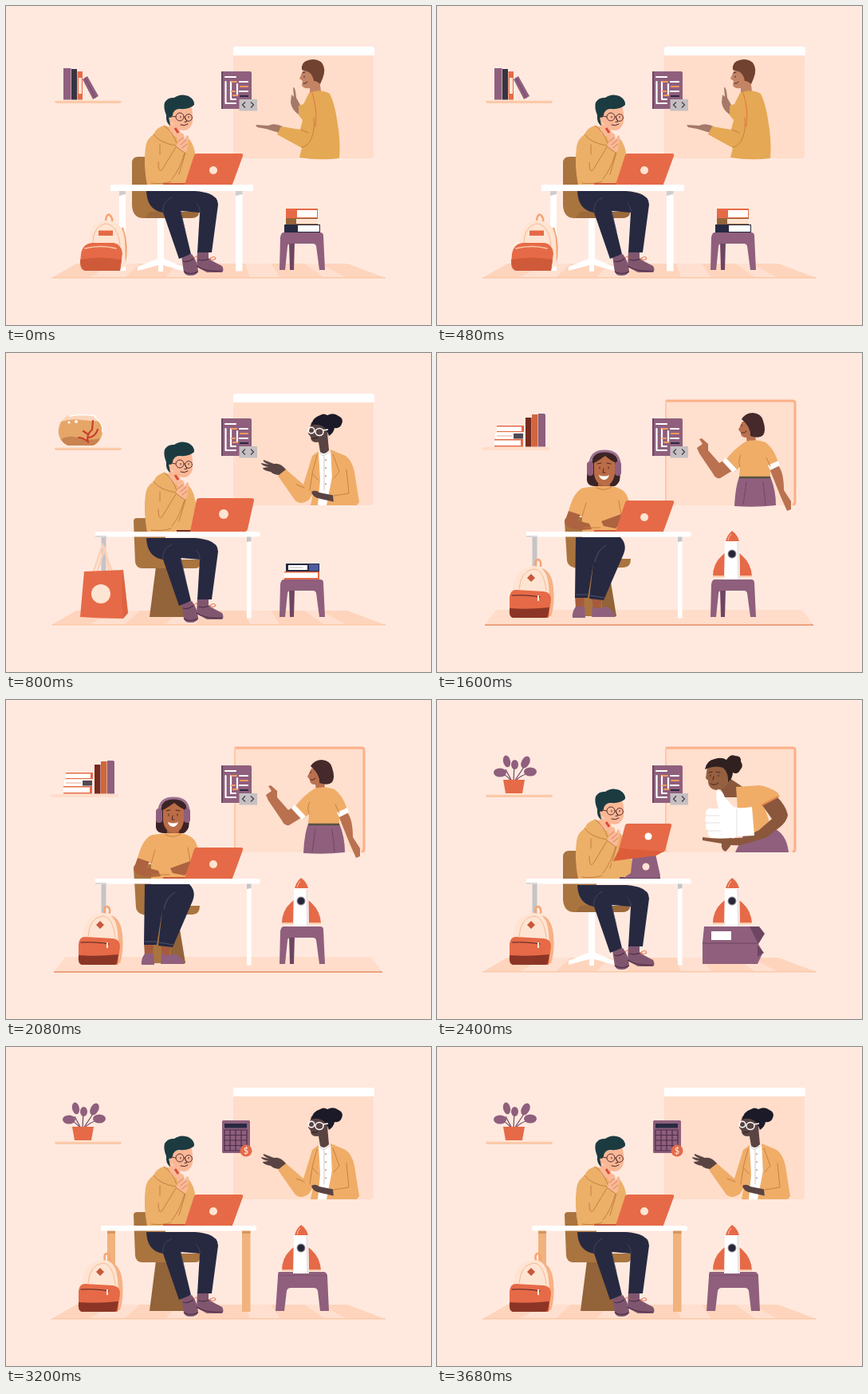
These frames come from a looping animation (533x400 px, 4000 ms). An HTML page:

```html
<!DOCTYPE html>
<html lang="en">
<head>
<meta charset="utf-8">
<title>Online lessons</title>
<style>
html, body { margin: 0; width: 100%; height: 100%; overflow: hidden; background: #ffe9df; }
svg { display: block; width: 100%; height: 100%; }
.scene { visibility: hidden; animation: 4s step-end infinite; }
#s0 { animation-name: a; } #s1 { animation-name: b; } #s2 { animation-name: c; }
#s3 { animation-name: d; } #s4 { animation-name: e; }
@keyframes a { 0% { visibility: visible } 20%, 100% { visibility: hidden } }
@keyframes b { 0% { visibility: hidden } 20% { visibility: visible } 40%, 100% { visibility: hidden } }
@keyframes c { 0% { visibility: hidden } 40% { visibility: visible } 60%, 100% { visibility: hidden } }
@keyframes d { 0% { visibility: hidden } 60% { visibility: visible } 80%, 100% { visibility: hidden } }
@keyframes e { 0% { visibility: hidden } 80%, 100% { visibility: visible } }
.red { fill: #e66a47 } .rust { fill: #cf5a3a } .wine { fill: #76291f }
.gold { fill: #ecb069 } .amber { fill: #f0ad68 } .wood { fill: #aa743f } .bark { fill: #936339 }
.plum { fill: #8f5f7d } .dusk { fill: #6e4562 } .shoe { fill: #80566f } .navy { fill: #272941 }
.white { fill: #fff } .cream { fill: #fee4d2 } .peach { fill: #ffddca } .tan { fill: #fbc9a8 }
.skin { fill: #fab896 } .dark { fill: #5a4443 } .brown { fill: #8a573d } .hair { fill: #1c3b41 }
.ln { fill: none; stroke: #c07c3d; stroke-width: .9; stroke-linecap: round; stroke-linejoin: round }
.dk { fill: none; stroke: #4a2528; stroke-width: 1; stroke-linecap: round }
.wl { fill: none; stroke: #fff; stroke-width: 1.5; stroke-linecap: round }
.bar { fill: none; stroke: #fff; stroke-width: 2.2; stroke-linecap: round }
.ol { fill: none; stroke: #f3995f; stroke-width: 2.2; stroke-linecap: round }
</style>
</head>
<body>
<svg viewBox="0 0 533 400" preserveAspectRatio="none">
<defs>
  <g id="floor">
    <path fill="#fed4bc" d="M88 323H428L476 341H57z"/>
    <path fill="#ffe0d0" d="M134 323H168L148 341H104zM216 323H246L238 341H200zM300 323H332L344 341H306zM374 323H394L428 341H400z"/>
    <path class="tan" d="M57 340H476V341.500H57z"/>
  </g>
  <g id="shelf">
    <path class="cream" d="M63 117.500H142L145 119.500H61z"/>
    <path class="tan" d="M61 119H145Q145 122 142 122H64Q61 122 61 119z"/>
  </g>
  <g id="plant">
    <path d="M94 102L86 87M96 102L97 80M97 102L109 84M93 102Q88 94 80 92M98 102Q105 94 115 92" fill="none" stroke="#6e4562" stroke-width="1.200"/>
    <g class="plum">
      <ellipse cx="79" cy="91" rx="8" ry="5.500"/>
      <ellipse cx="87.500" cy="77" rx="4.500" ry="7.500" transform="rotate(-12 87 77)"/>
      <ellipse cx="97.500" cy="81" rx="4.500" ry="6"/>
      <ellipse cx="111" cy="78" rx="5" ry="8" transform="rotate(28 111 78)"/>
      <ellipse cx="117" cy="90" rx="8" ry="5.500"/>
    </g>
    <path class="red" d="M83 100H110L107 117H86z"/>
  </g>
  <g id="wall">
    <path class="peach" d="M285 61H461V187Q461 191 457 191H285z"/>
    <path class="white" d="M285 62V54Q285 51 288 51H458Q462 51 462 54V62z"/>
  </g>
  <g id="board">
    <path fill="#ffdfce" d="M287 59H448V191H287z"/>
    <path d="M287 60H446Q449 60 449 63V187Q449 190 446 190" fill="none" stroke="#fbb088" stroke-width="3"/>
    <path class="tan" d="M286 59H288V191H286z"/>
  </g>
  <g id="code">
    <path class="plum" d="M271 82H306Q308 82 308 84V129H272Q270 129 270 127V84z"/>
    <path class="dusk" d="M270 82H272V129H270z"/>
    <path class="bar" d="M275 89H288M293 95H303M275.500 95V121M282 95V116M282 117H288M275.500 122H288M290 98V112M293 107H303"/>
    <path class="ol" d="M283 95H289M283 107H287M294 101H303M285 112H290"/>
    <path class="navy" d="M293 112H304V114H293z"/>
    <path fill="#c5bfc1" d="M292.500 117H315V131.500H292.500z"/>
    <path d="M300 120.500L296.500 124L300 127.500M307 120.500L310.500 124L307 127.500" fill="none" stroke="#443c4c" stroke-width="1.200"/>
  </g>
  <g id="calc">
    <rect class="plum" x="271" y="92" width="35" height="41" rx="1.500"/>
    <path class="navy" d="M274 96H302V101.500H274z"/>
    <path d="M274 104H302V130H274zM281 104V130M288 104V130M295 104V130M274 110.500H302M274 117H302M274 123.500H302" fill="none" stroke="#4b2f4a" stroke-width="1.200"/>
    <circle class="red" cx="301" cy="130" r="7.500"/>
    <text x="301" y="134" font-size="11" text-anchor="middle" fill="#fff" font-family="Lato, sans-serif">$</text>
  </g>

  <g id="swivel">
    <path class="white" d="M190 264H198V317L222 327V332L197 325V333H191V325L165 332V327L190 317z"/>
    <path class="wood" d="M158 197Q158 189 166 189H200V258H242Q242 266 232 266H172Q159 266 158 250z"/>
    <path class="bark" d="M180 258H242Q242 266 232 266H174z" opacity=".6"/>
  </g>
  <g id="block">
    <path class="bark" d="M188 268H207L235 331H180z"/>
    <path class="wood" d="M160 211Q160 207 164 207H200V259H243V265Q243 270 237 270H170Q163 269 162 262z"/>
  </g>
  <g id="desk">
    <path fill="#c5c4c7" d="M119.500 230H125.500V300H119.500z"/>
    <path class="white" d="M302 230H307.500V332.500H302z"/>
    <path fill="#c5c4c7" d="M302 230H307.500V236L302 237z"/>
  </g>
  <g id="top">
    <path class="white" d="M112 224H316Q318.500 224 318.500 226V228Q318.500 230.500 316 230.500H112z"/>
    <path fill="#dcd9da" d="M112 229H126V231H112z"/>
  </g>

  <g id="legs">
    <path class="shoe" d="M220 314L233 311Q240 320 241 332Q240 338 231 338Q224 338 223 333z"/>
    <path class="shoe" d="M240 307H254V317Q263 322 271 326Q274 331 271 334H252L239 327z"/>
    <path d="M223 333Q231 338 241 333M239 326Q252 334 271 332M222 320Q228 322 235 317M241 318Q248 320 255 317" fill="none" stroke="#4f2f48" stroke-width="1.200"/>
    <path d="M255 317Q262 312 263 317Q260 320 255 317M236 316Q240 311 240 317" fill="none" stroke="#e66a47"/>
    <path class="navy" d="M176 232H237Q266 234 266 249L258 309H240L243 259L219 257L232 311L217 317L197 259Q177 256 176 232z"/>
    <path d="M197 258Q195 246 208 240M243 260Q244 252 238 247M219 257L225 283" fill="none" stroke="#484b66" stroke-width=".8"/>
  </g>
  <g id="boy">
    <path class="gold" d="M177 225Q172 198 175 177Q176 167 185 161Q189 152 198 150Q208 150 216 164L222 177L229 166Q236 173 238 190L235 225z"/>
    <path class="skin" d="M204 145L205 158Q211 166 219 164L218 154z"/>
    <path class="skin" d="M206 130Q220 131 232 125Q235 134 234 146Q231 156 222 156Q213 154 209 147Q202 146 203 139Q204 136 207 139z"/>
    <path class="hair" d="M206 150Q200 146 201 137Q197 127 199 121Q203 114 211 115Q219 109 229 113Q237 118 236 124Q230 130 218 129Q210 129 209 137L207 140Q203 138 205 144z"/>
    <g fill="none" stroke="#5b3032"><circle cx="218" cy="139" r="5"/><circle cx="229" cy="140" r="4.400"/><path d="M207 138L213 139M223 139H225"/></g>
    <path class="dk" d="M219 138.500V140M229 138.500V140M225 141L227 145L224 145.500M219 149Q224 151 228 148"/>
    <path class="skin" d="M213 162Q218 156 223 161L224 167L227 162Q230 162 229 168L227 181L221 188L211 180L216 170z"/>
    <path class="ln" style="stroke:#d07655" d="M216 170L222 165M219 174L226 168M221 178L227 173"/>
    <path d="M212 153L216 159" stroke="#d94b35" stroke-width="3"/>
    <path class="gold" d="M191 206L213 176L224 184Q218 205 208 217Q200 225 193 223z"/>
    <path class="gold" d="M223 185L230 178L238 187L232 212L222 224H207z"/>
    <path class="ln" d="M213 176L224 184Q218 205 208 217M213 177L196 205Q191 211 191 196M185 161Q193 172 213 175M198 150Q209 157 214 172M193 174V186M182 222Q197 224 207 220M225 184L217 211"/>
  </g>
  <g id="laptop">
    <path class="rust" d="M197 222H284V224H197z"/>
    <path class="red" d="M239 185H295Q298 185 297 188L285 221Q284 224 281 224H224L236 187Q237 185 239 185z"/>
    <circle class="cream" cx="260" cy="206" r="5"/>
  </g>

  <g id="pack">
    <path d="M124 268Q122 259 127 259Q131 260 130 268" fill="none" stroke="#f5a574" stroke-width="2.500"/>
    <path fill="#f7b286" d="M132 270Q144 274 146 294Q148 316 143 330H136z"/>
    <path class="cream" d="M95 302Q96 269 121 267Q138 267 140 292L142 322L138 331H97z"/>
    <path class="ln" style="stroke:#f3b48c" d="M103 296Q105 273 121 271Q134 271 137 298"/>
    <path fill="#c9583c" d="M118 277L123 282L118 287L113 282z"/>
    <path class="red" d="M91 306Q92 297 99 297L134 299Q143 300 143 309L140 332H95Q90 330 91 322z"/>
    <path class="wine" d="M91 320Q114 322 141 319L139 330Q138 332 134 332H95Q90 331 91 320z" opacity=".8"/>
    <path class="dk" d="M94 304Q114 303 129 306"/><path class="cream" d="M126 304H128V311H126z"/>
  </g>
  <g id="stool">
    <path class="dusk" d="M355 296H362L361 331H356z"/>
    <path class="plum" d="M348 284H394Q398 284 398 288L400 331H393L389 301Q388 298 385 298H357Q353 298 353 302L350 331H343L344 290Q345 284 348 284z"/>
  </g>
  <g id="rocket">
    <path class="red" d="M361 251Q346 262 346 280H361zM379 251Q394 262 395 280H379z"/>
    <path class="white" d="M361 236H379L380 284H360z"/>
    <path class="red" d="M362 236Q364 228 370 223Q377 228 379 236z"/>
    <path d="M369 227Q366 230 365 235" stroke="#ffc2a8" fill="none"/>
    <circle cx="370" cy="252" r="4.800" fill="#252638" stroke="#77717d" stroke-width="1.200"/>
    <path class="tan" d="M346 279H361V281H346zM379 279H395V281H379z"/>
    <path d="M379 237L380 284H377L376 237z" fill="#eee5e4"/>
  </g>

  <g id="mentor">
    <path class="dark" d="M352 147Q344 137 336 139L323 134Q321 136 330 140L320 138Q320 141 329 143L322 144Q322 147 332 149Q336 153 344 153z"/>
    <path class="white" d="M391 124L398 121L408 124L409 191H388z"/>
    <path class="dark" d="M391 106L403 100L405 122Q399 129 394 124z"/>
    <path class="dark" d="M383 87Q394 84 404 92L403 104Q397 112 389 112Q382 112 382 105L379 101z"/>
    <path fill="#1c1a28" d="M383 91Q384 81 394 78Q398 75 403 78Q411 74 417 79Q424 82 421 89Q419 95 412 94Q411 100 405 104Q403 96 397 92Q390 88 383 91z"/>
    <g fill="none" stroke="#fff" stroke-width="1.500"><circle cx="383" cy="97" r="3.800"/><ellipse cx="393" cy="99" rx="5" ry="4.500"/><path d="M397 97L404 96"/></g>
    <path class="dk" style="stroke:#241a20" d="M384 107Q388 108 391 106"/>
    <path class="amber" d="M392 123L384 129L373 165L351 146L341 154L362 184Q369 192 380 184L385 176L382 191H391L394 160z"/>
    <path class="amber" d="M407 121L426 129Q434 135 437 149L443 187L440 191H402L409 155z"/>
    <path class="dark" d="M413 187L395 183Q384 181 383 174Q388 171 393 175L413 179z"/>
    <path class="amber" d="M410 178L428 177L443 185Q440 190 433 190L411 189z"/>
    <path class="ln" d="M390 128L384 151L391 159M410 127L418 149L411 157M384 152L381 172M427 146L430 176L411 179M364 165L374 169"/>
    <path class="ln" style="stroke:#ccc2c0" d="M393 125L398 129L406 124M399 130V172"/>
    <path class="dk" d="M401 134V134.500M401 144V144.500M401 154V154.500M401 164V164.500"/>
  </g>
  <g id="man">
    <path fill="#a5796a" d="M357 121L358 111L361 114L360 102Q363 101 364 115L369 124L368 137Q358 130 357 121z"/>
    <path fill="#a5796a" d="M347 151Q336 146 329 150L313 149L315 152L326 154L346 160z"/>
    <path fill="#c38465" d="M373 80L392 84L395 107L381 110V103Q372 104 371 99L372 94L368 91z"/>
    <path fill="#71422f" d="M371 80Q370 70 379 68Q389 65 396 71Q402 79 397 91L394 98Q390 94 386 94Q384 84 378 82z"/>
    <path class="dk" d="M374 88V89.500M372 84L375 83M373 97Q376 98 378 95"/>
    <path fill="#e5a854" d="M380 109Q394 103 406 110Q412 122 415 142Q420 170 418 191Q393 194 368 190L371 178L340 161L345 151L369 155L372 143L367 137V125L373 123z"/>
    <path class="ln" d="M386 140Q388 153 383 166Q379 176 371 177M370 155L379 159"/>
    <path d="M384 109Q391 130 388 151" class="ln" style="stroke:#e66a47"/>
  </g>
</defs>

<rect width="533" height="400" fill="#ffe9df"/>

<g class="scene" id="s0">
  <use href="#floor"/><use href="#wall"/><use href="#man"/><use href="#code"/><use href="#shelf"/>
  <path class="plum" d="M72 78H81.500V117.500H72z"/><path fill="#373441" d="M82 79H89V117.500H82z"/>
  <path class="red" d="M89.500 82H96V117.500H89.500z"/><path class="cream" d="M91 90H95V110H91z"/>
  <path class="plum" d="M96 92L102 88L116 113L109 117z"/><path class="ln" style="stroke:#6e4562" d="M99 90L112 115"/>
  <path class="white" d="M142 232H150V332H142zM288 232H296.500V332.500H288z"/>
  <path fill="#cfcdd0" d="M142 232H150V236L142 238zM288 232H296.500V236L288 238z"/>
  <use href="#swivel"/><use href="#legs"/><use href="#boy"/>
  <rect class="white" x="131" y="224" width="179" height="8" rx="1.500"/><use href="#laptop"/>
  <path d="M125 269Q126 260 130 262Q134 266 133 270M146 278Q154 302 148 326" fill="none" stroke="#f5a574" stroke-width="2.500"/>
  <path class="cream" d="M104 302Q103 271 125 269Q148 269 149 296L150 325L141 331H104z"/>
  <path class="ln" style="stroke:#f3b48c" d="M109 297Q109 277 124 273Q140 273 143 300"/>
  <path class="red" d="M116 281.500H134V288H116z"/>
  <path class="red" d="M94 311Q96 298 108 297H135Q145 299 146 310L143 332H99Q93 330 93 322z"/>
  <path class="rust" d="M93 318Q119 313 145 318L143 332H99Q93 330 93 318z"/>
  <path class="wl" style="stroke:#fbc9a8" d="M99 304Q119 299 138 304"/>
  <use href="#stool"/>
  <path class="red" d="M351 254H391V266H351z"/><path class="white" d="M365 256H390V265H365z"/>
  <path class="bark" d="M351 266H391V274H351z"/><path class="cream" d="M364 267H391V273H364z"/>
  <path class="navy" d="M349 274H394V284H349z"/><path class="white" d="M366 275H393V283H366z"/>
</g>

<g class="scene" id="s1">
  <use href="#floor"/><use href="#wall"/><use href="#mentor"/><use href="#code"/><use href="#shelf"/>
  <path fill="#fbd5b9" d="M78 78H110Q122 85 122 97Q121 112 109 116H78Q66 112 65 97Q66 85 78 78z"/>
  <path fill="#e6a668" d="M69 86Q82 82 95 84Q108 85 118 86Q126 106 109 116H78Q60 107 69 86z"/>
  <path fill="#c98350" d="M69 108Q80 102 92 107Q106 110 118 107Q115 114 109 116H78Q72 114 69 108z"/>
  <path d="M103 112Q100 103 108 96L109 85M101 110Q96 106 91 106M104 106Q112 105 115 96M103 102L97 98" fill="none" stroke="#c83f2c" stroke-width="2.200" stroke-linecap="round"/>
  <path class="wl" d="M80 79Q95 76 112 79M111 80Q122 87 121 99"/>
  <circle class="white" cx="88" cy="86" r="2"/><circle class="white" cx="79" cy="87" r="1.500"/>
  <use href="#desk"/><use href="#block"/><use href="#legs"/><use href="#boy"/><use href="#top"/>
  <path class="wine" d="M214 222H300V224H214z"/>
  <path class="red" d="M242 182H308Q311 182 311 185L303 221Q302 224 299 224H231L239 184Q240 182 242 182z"/>
  <circle class="cream" cx="273" cy="202" r="6"/>
  <path d="M109 276L121 241L133 274M114 276L124 243L129 274" fill="none" stroke="#fbd2b8" stroke-width="2.500"/>
  <path class="red" d="M98 274L147 272L153 326L147 333Q120 333 93 331z"/>
  <path class="rust" d="M147 272L153 326L147 333L145 310z" opacity=".4"/>
  <circle class="cream" cx="119" cy="302" r="12"/>
  <use href="#stool"/>
  <path class="navy" d="M351 264H393V274H351z"/><path class="white" d="M354 266H378V272H354z"/><path fill="#4f5ba0" d="M380 265H392V273H380z"/><path class="dk" d="M356 269H372" style="stroke:#b9b4bb"/>
  <path class="red" d="M349 274H393V284H349z"/><path class="white" d="M349 275.500H391V282H349z"/>
</g>

<g class="scene" id="s2">
  <path class="peach" d="M74 322H458L472 341H60z"/><path fill="#eda27f" d="M60 340H472V342H60z"/>
  <use href="#board"/>
  <g fill="#b9714f">
    <path d="M373 146L355 157Q349 158 346 151L329 126L326 119L333 114L329 108L332 107L340 114V122L354 138L364 132z"/>
    <path d="M417 145L428 141Q435 150 435 172L444 186V196L439 198L431 180z"/>
    <path d="M383 86H397L400 111L389 113L388 106Q381 106 381 100L378 96z"/>
  </g>
  <path fill="#45292b" d="M382 83Q387 75 396 75Q407 76 409 85Q413 97 409 103Q404 108 393 104Q394 93 382 83z"/>
  <path class="dk" d="M382 90V91.500M382 100Q386 101 388 98"/>
  <path class="amber" d="M387 111Q399 107 412 112Q422 119 428 137L418 142L418 156H379L380 143L373 149L361 136Q371 121 387 111z"/>
  <path class="white" d="M362 131L376 146L371 150L358 136zM415 141L428 135L430 141L418 147z"/>
  <path class="plum" d="M379 155H418Q425 172 425 191Q400 194 373 192Q374 169 379 155z"/>
  <path d="M379 156H418" stroke="#57533f" stroke-width="2.500"/>
  <path class="ln" d="M380 143Q377 134 381 128M418 142L413 131"/>
  <path class="ln" style="stroke:#6e4562" d="M388 162L384 190M409 162L412 190"/>
  <use href="#code"/>
  <path class="peach" d="M57 118H141V122H57z"/>
  <path class="red" d="M75 91H109V99H75zM72 108H108V117.500H72z"/><path class="white" d="M75 92.500H106V98H75zM72 109.500H105V116H72z"/>
  <path class="white" d="M73 100H98V107.500H73z"/><path fill="#504954" d="M96 101H108V107.500H96z"/><path d="M75 104H94" stroke="#e5a98b"/>
  <path class="wine" d="M111 81H118.500V117.500H111z"/><path fill="#cf663d" d="M119 77H126.500V117.500H119z"/><path class="plum" d="M127 76H134Q136 76 136 78V117.500H127z"/>
  <use href="#desk"/>
  <path class="wood" d="M160 211Q160 206 165 206H182V250L188 258H243Q243 269 234 269H208L225 330H185L180 270Q164 270 163 260z"/>
  <path class="bark" d="M207 269H215L225 330H207z"/>
  <path fill="#a65c3c" d="M173 304H185L184 321H174zM194 304H207L205 323H196z"/>
  <path class="plum" d="M174 318H185L186 332H170Q169 325 174 318zM195 318Q203 322 212 318Q220 321 224 331H194z"/>
  <path class="navy" d="M174 231H230Q239 240 234 252L209 310L191 308L196 264L189 307H173z"/>
  <path d="M198 262Q201 247 212 241M174 303H189M192 304L210 307" fill="none" stroke="#50536c"/>
  <path fill="#3b2325" d="M194 140Q194 122 211 122Q228 123 227 141Q231 149 229 160Q225 169 217 167H198Q187 167 188 156Q187 149 194 140z"/>
  <path fill="#a65c3c" d="M202 158H217V170Q209 177 202 169z"/>
  <path fill="#ba6d46" d="M197 138Q204 134 211 129Q218 135 223 137V152Q220 166 210 167Q199 165 197 152z"/>
  <path class="dk" d="M204 143V145M215 143V145M201 139L206 138M213 138L218 139M209 145L208 150H211"/>
  <path class="white" d="M203 153Q210 156 216 153Q214 159 209 159Q204 158 203 153z"/>
  <path d="M192 139Q193 123 210 123Q228 123 229 139" fill="none" stroke="#9c7291" stroke-width="3"/>
  <rect class="plum" x="188" y="136" width="8" height="18" rx="4"/><rect class="plum" x="223" y="136" width="8" height="18" rx="4"/>
  <path class="amber" d="M201 167H219Q236 170 239 181L243 192L231 203V224H182V205L165 198Q172 172 184 169z"/>
  <path fill="#ad633f" d="M165 198L180 203L176 210L191 214L194 221L181 222Q161 220 160 212zM231 202L241 197L238 205L224 220L209 217L206 211Q217 207 231 202z"/>
  <path class="ln" d="M200 169Q210 174 219 168M182 205L187 188M231 203L228 185M184 219H205"/>
  <use href="#top"/><use href="#laptop"/><use href="#pack"/><use href="#stool"/><use href="#rocket"/>
</g>

<g class="scene" id="s3">
  <use href="#floor"/><use href="#board"/>
  <path class="plum" d="M374 191L384 170L420 160Q438 166 441 191z"/>
  <path class="brown" d="M352 104L367 98L385 110L376 122H360z"/>
  <path class="amber" d="M375 109L404 107Q417 109 427 116L430 121L410 133L418 156L397 170L378 150z"/>
  <path class="brown" d="M408 132L427 122Q437 132 440 144Q439 153 428 161L412 173L381 182Q364 183 357 178Q370 172 384 173L404 163L420 149z"/>
  <path d="M407 132L428 121" stroke="#e58a50" stroke-width="2"/>
  <path fill="#95603f" d="M339 84Q352 76 366 86L367 100Q362 113 351 113Q340 112 340 101L337 98z"/>
  <path fill="#302020" d="M336 87Q338 76 348 74Q357 71 363 75Q368 67 374 70Q382 70 381 77Q385 83 380 88Q377 94 371 91Q371 98 365 103Q366 92 359 85Q349 81 336 87z"/>
  <path class="dk" d="M343 94V95.500M353 94V95.500M341 91L345 90M350 90L355 91M347 96L346 100M343 105Q348 108 353 104"/>
  <path class="white" d="M353 136Q348 116 352 112Q357 111 361 122L371 133Q376 137 395 134L398 170L376 171Q370 175 345 173Q338 171 340 164Q335 161 338 154Q334 149 338 145Q335 139 341 136z"/>
  <path class="ln" style="stroke:#e4dcdc" d="M339 145H355M338 154H355M340 164H356M376 137V171"/>
  <path class="brown" d="M333 172Q350 175 370 173Q373 179 362 190Q356 188 357 180L333 176z"/>
  <use href="#code"/><use href="#shelf"/><use href="#plant"/>
  <use href="#desk"/><use href="#swivel"/><use href="#legs"/><use href="#boy"/>
  <path class="gold" d="M219 202L244 199L246 221H221z"/>
  <use href="#top"/>
  <path class="dusk" d="M229 222H280V224H229z"/>
  <path class="plum" d="M245 197L274 193L280 220Q280 223 276 223H234L243 217z"/>
  <path class="red" d="M239 155H292Q295 155 294 158L286 189Q285 191 282 191L228 187L236 157Q237 155 239 155z"/>
  <path fill="#dd5d3a" d="M229 186L284 190L275 195L221 202z"/>
  <circle class="white" cx="265" cy="171" r="4.500"/><circle class="cream" cx="262" cy="209" r="4.500"/>
  <use href="#pack"/><use href="#rocket"/>
  <path class="plum" d="M335 284H403V306L409 316L402 331H333V304z"/>
  <path class="dusk" d="M392 284H404L411 293L403 306zM402 308L410 317L402 322z"/>
  <path d="M333 305H402" stroke="#6e4562"/>
  <path class="white" d="M344 290H369V301H344z"/>
</g>

<g class="scene" id="s4">
  <use href="#floor"/><use href="#wall"/><use href="#mentor"/><use href="#calc"/><use href="#shelf"/><use href="#plant"/>
  <path fill="#f1b27c" d="M127 230H137V331H127zM296 230H306.500V332H296z"/><path fill="#d99659" d="M127 230H137V234H127zM296 230H306.500V234H296z"/>
  <use href="#block"/><use href="#legs"/><use href="#boy"/>
  <rect class="white" x="119" y="224" width="195" height="6.500" rx="2"/>
  <use href="#laptop"/><use href="#pack"/>
  <path class="plum" d="M342 282H399Q403 283 403 288L405 331H394L391 306Q390 302 386 302H357Q353 302 352 306L349 331H338L341 288Q341 283 342 282z"/>
  <path class="dusk" d="M341 286H403V287H341z" opacity=".4"/>
  <use href="#rocket"/>
</g>
</svg>
</body>
</html>
```
